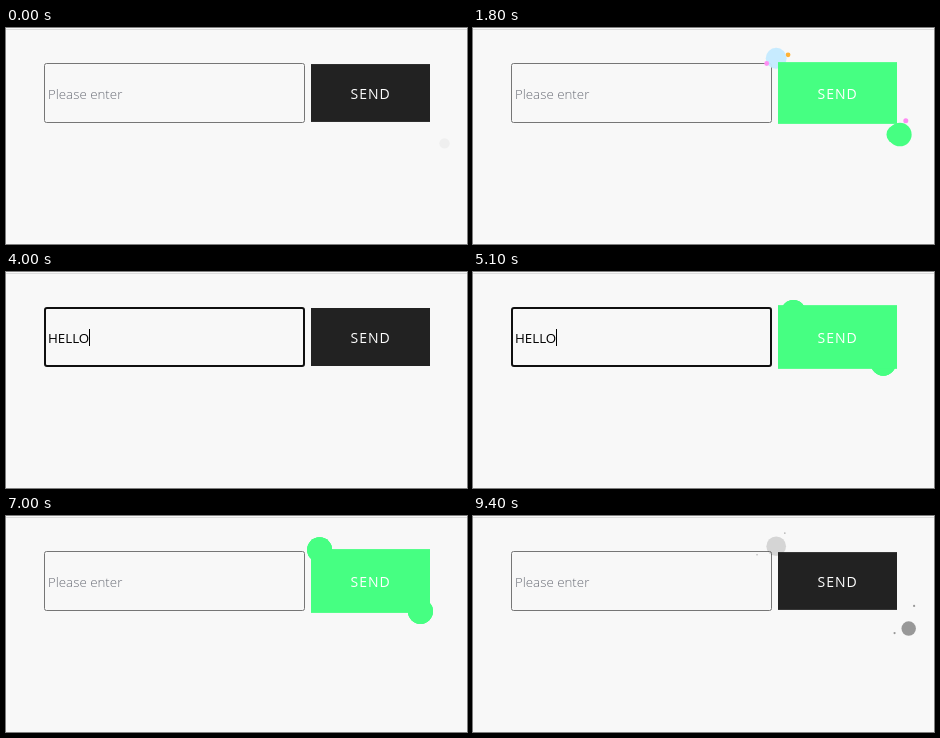
Recreate the animation shown at these times as an HTML page with a canvas. Size 461x216 px, loop 9.5 s.

```html
<!DOCTYPE html>
<html lang="en">
<head>
<meta charset="utf-8">
<title>Bubble button</title>
<style>
html, body { margin: 0; width: 100%; height: 100%; overflow: hidden; background: #f8f8f8; }
canvas { display: block; }
</style>
</head>
<body>
<canvas id="stage" width="461" height="216"></canvas>
<script>
const ctx = document.getElementById('stage').getContext('2d');
const LOOP = 9500, STEP = 100, SPEED = 2.25 / 1000;
const BG = '#f8f8f8';
const DARK = [34, 34, 34], GREEN = [70, 255, 130];
const ORANGE = [255, 176, 48], BLUE = [196, 234, 255], PINK = [255, 140, 244];

// Hover spans: the bubbles restart at the first time of each
const hovers = [[395, 820], [1215, 1950], [4740, 5450], [5710, 6250], [6495, 7250], [7500, 8000], [8630, 9050]];
const keys = [[3200, 'H'], [3500, 'E'], [3700, 'L'], [3800, 'L'], [4000, 'O']];
const FOCUS = 2200, BLUR = 6400, CLEAR = 6800;

// split: offset when a bubble breaks off; drift: offset while it fades
const corners = [
  {
    x: 334.2, y: 54.3, move: -25, start: 0, travel: 1.2,
    bubbles: [
      { split: [6, -2], drift: [-5, -15], size: [0.2, 0], color: ORANGE },
      { split: [-6, 1], drift: [0, 0], size: [0.84, 0.76], color: BLUE, fade: 1.6 },
      { split: [-15, 6], drift: [-15, 5], size: [0.2, 0], color: PINK }
    ]
  },
  {
    x: 394.8, y: 75.7, move: 30, start: 0.2, travel: 1.1,
    bubbles: [
      { split: [-6, 3], drift: [5, 15], size: [0.2, 0], color: ORANGE },
      { split: [7, 3], drift: [7, 7], size: [0.8, 0.4], color: BLUE },
      { split: [8, -13], drift: [15, -5], size: [0.2, 0], color: PINK, early: 0.1 }
    ]
  }
];

const clamp = v => Math.max(0, Math.min(1, v));
const lerp = (a, b, p) => a + (b - a) * p;
const easeOut = p => 1 - (1 - p) ** 2;
const mix = (a, b, p) => `rgb(${a.map((v, i) => Math.round(lerp(v, b[i], p))).join(',')})`;

// Quick at both ends, slow in the middle
function slowMo(p) {
  const edge = 0.45, r = p + (0.5 - p) * 0.7;
  if (p < edge) return r - r * (1 - p / edge) ** 4;
  if (p > 1 - edge) return r + (p - r) * ((p - 1 + edge) / edge) ** 4;
  return r;
}

function elastic(p) {
  if (p <= 0) return 0;
  if (p >= 1) return 1;
  const period = 0.4, turn = Math.PI * 2 / period;
  return 1 + 1.2 * 2 ** (-10 * p) * Math.sin(p * turn - Math.asin(1 / 1.2));
}

function hoverLevel(t, lead) {
  return Math.max(...hovers.map(([from, to]) =>
    Math.min(clamp((t - from + lead) / 60), clamp((to - t) / 100 + 1))));
}

function circle(x, y, r, color, alpha) {
  if (r <= 0 || alpha <= 0) return;
  ctx.globalAlpha = alpha;
  ctx.fillStyle = color;
  ctx.beginPath();
  ctx.arc(x, y, r, 0, Math.PI * 2);
  ctx.fill();
  ctx.globalAlpha = 1;
}

function drawBubbles(s, level) {
  for (const c of corners) {
    const local = s - c.start;
    const away = c.move * slowMo(clamp(local / c.travel));
    for (const b of c.bubbles) {
      const burst = local - c.travel + (b.early || 0);
      const p = easeOut(clamp(burst / 0.1));
      const q = easeOut(clamp(local - c.travel - 0.1));
      const r = 12.5 * (q > 0 ? lerp(b.size[0], b.size[1], q) : lerp(1, b.size[0], p));
      const x = c.x + away + b.split[0] * p + b.drift[0] * q;
      const y = c.y + away + b.split[1] * p + b.drift[1] * q;
      const tint = burst > 0.02 ? b.color : GREEN;
      circle(x, y, r, mix(DARK, tint, level), (1 - q) ** (b.fade || 1));
    }
  }
}

function label(text, x, color, weight, size, spacing) {
  ctx.font = `${weight} ${size}px "Open Sans", "Noto Sans", sans-serif`;
  ctx.letterSpacing = spacing + 'px';
  ctx.fillStyle = color;
  ctx.fillText(text, x, 71);
}

function drawButton(s, level) {
  const grow = 0.1 * easeOut(clamp((s - 0.1) / 0.8));
  const scale = 1 + grow * (1 - elastic((s - 1.28) / 1.8));
  const h = 58 * scale;
  ctx.fillStyle = mix(DARK, GREEN, level);
  ctx.fillRect(305, 65 - h / 2, 119, h);
  label('SEND', 344.5, '#fff', 400, 14, 1);
}

function drawInput(t) {
  const focused = t >= FOCUS && t < BLUR;
  const inset = focused ? 1 : 0.5;
  ctx.strokeStyle = focused ? '#101010' : '#767676';
  ctx.lineWidth = focused ? 2 : 1;
  ctx.beginPath();
  ctx.roundRect(38 + inset, 35 + inset, 261 - 2 * inset, 60 - 2 * inset, 2);
  ctx.stroke();

  const typed = t < CLEAR ? keys.filter(k => k[0] <= t) : [];
  const text = typed.map(k => k[1]).join('');
  label(text || 'Please enter', 42, text ? '#000' : '#6c6f78', text ? 400 : 300, 13.333, 0);

  const blinkFrom = typed.length ? typed[typed.length - 1][0] : FOCUS;
  if (focused && Math.floor((t - blinkFrom) / 500) % 2 === 0) {
    const x = text ? 42 + ctx.measureText(text).width : 42;
    ctx.fillStyle = '#000';
    ctx.fillRect(Math.floor(x), 57, 1, 17);
  }
}

function draw(t) {
  ctx.fillStyle = BG;
  ctx.fillRect(0, 0, 461, 216);
  ctx.fillStyle = '#dcdcdc';
  ctx.fillRect(0, 1, 461, 1);

  const run = hovers.filter(h => h[0] <= t).pop();
  const s = run ? (t - run[0]) * SPEED : 2.2;
  drawInput(t);
  drawBubbles(s, hoverLevel(t, 0));
  drawButton(s, hoverLevel(t, 60));
}

const begin = performance.now();
function tick() {
  const t = (performance.now() - begin) % LOOP;
  draw(Math.floor(t / STEP) * STEP);
  requestAnimationFrame(tick);
}
tick();
</script>
</body>
</html>
```
